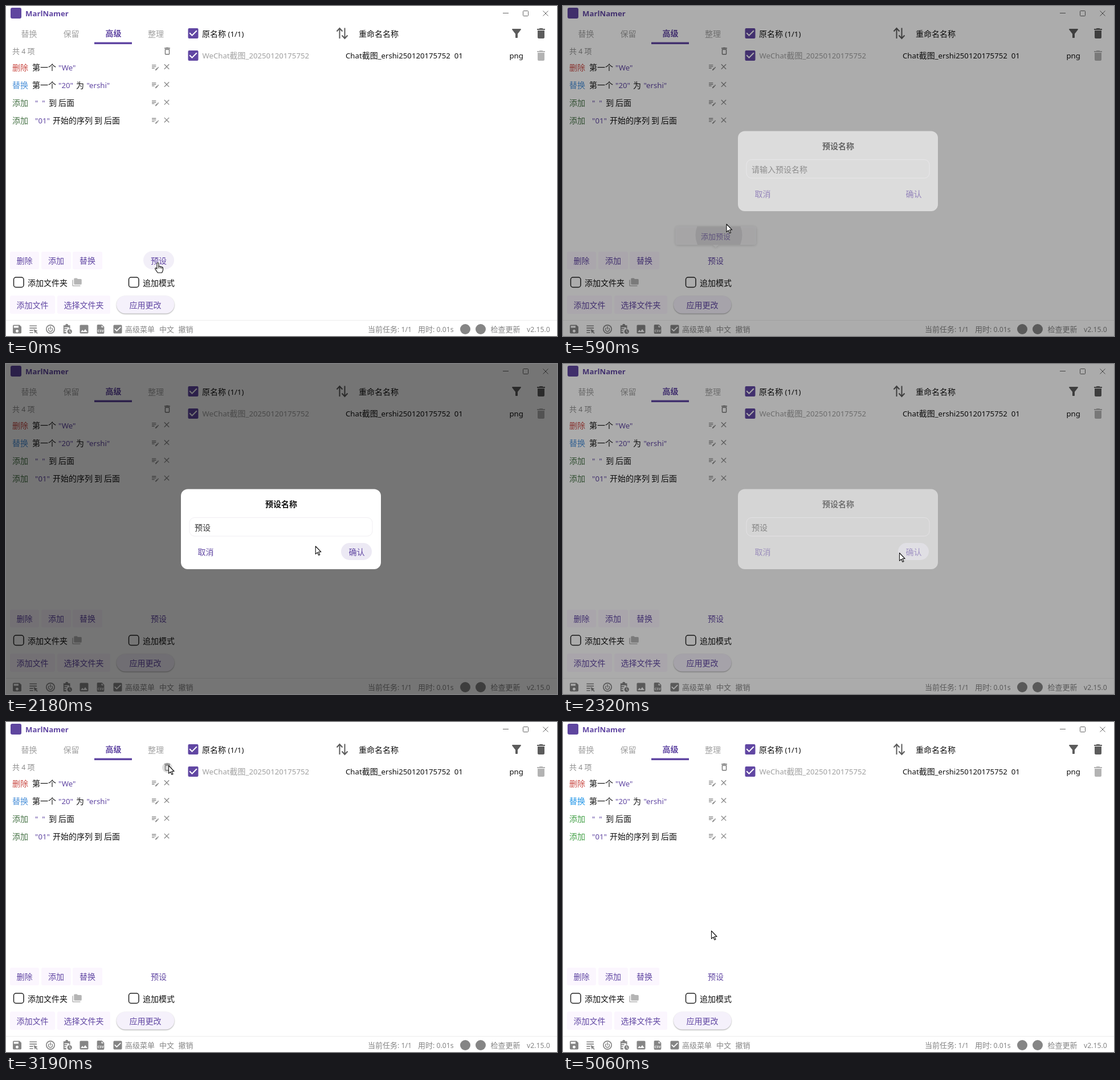
Recreate the animation shown at these times as an HTML page with a canvas. Size 967 px wide and 579 px high, loop 6680 ms.

```html
<!DOCTYPE html>
<html lang="zh-CN">
<head>
<meta charset="utf-8">
<title>批量重命名</title>
<style>
html, body { margin: 0; width: 100%; height: 100%; overflow: hidden; background: #fff; }
canvas { display: block; width: 967px; height: 579px; }
</style>
</head>
<body>
<canvas id="stage"></canvas>
<script>
const W = 967, H = 579, LOOP = 6680, TICK = 66.6;
const PURPLE = '#6147a3', BLACK = '#111', GRAY = '#a0a0a0', DARK = '#5c5c5c', FOOT = '#858585';
const canvas = document.getElementById('stage');
const ctx = canvas.getContext('2d');
const ratio = window.devicePixelRatio || 1;
canvas.width = W * ratio;
canvas.height = H * ratio;

// 24-unit icon outlines
const ICONS = Object.fromEntries(Object.entries({
  box: 'M19 3H5a2 2 0 0 0-2 2v14a2 2 0 0 0 2 2h14a2 2 0 0 0 2-2V5a2 2 0 0 0-2-2zm-9 14-5-5 1.41-1.41L10 14.17l7.59-7.59L19 8l-9 9z',
  trash: 'M6 19c0 1.1.9 2 2 2h8c1.1 0 2-.9 2-2V7H6v12zM19 4h-3.5l-1-1h-5l-1 1H5v2h14V4z',
  trashLine: 'M6 19c0 1.1.9 2 2 2h8c1.1 0 2-.9 2-2V7H6v12zM8 9h8v10H8V9zm7.5-5l-1-1h-5l-1 1H5v2h14V4h-3.5z',
  filter: 'M4.25 5.61C6.27 8.2 10 13 10 13v6c0 .55.45 1 1 1h2c.55 0 1-.45 1-1v-6s3.72-4.8 5.74-7.39A1 1 0 0 0 18.95 4H5.04a1 1 0 0 0-.79 1.61z',
  close: 'M19 6.41 17.59 5 12 10.59 6.41 5 5 6.41 10.59 12 5 17.59 6.41 19 12 13.41 17.59 19 19 17.59 13.41 12z',
  edit: 'M3 10h11v2H3v-2zm0-2h11V6H3v2zm0 8h7v-2H3v2zm15.01-3.13.71-.71a1 1 0 0 1 1.41 0l.71.71a1 1 0 0 1 0 1.41l-.71.71-2.12-2.12zm-.71.71-5.3 5.3V21h2.12l5.3-5.3-2.12-2.12z',
  folders: 'M3 6H1v13a2 2 0 0 0 2 2h17v-2H3V6zM21 4h-7l-2-2H7a2 2 0 0 0-2 2V15a2 2 0 0 0 2 2h14a2 2 0 0 0 2-2V6a2 2 0 0 0-2-2z',
  save: 'M17 3H5a2 2 0 0 0-2 2v14a2 2 0 0 0 2 2h14c1.1 0 2-.9 2-2V7l-4-4zm-5 16c-1.66 0-3-1.34-3-3s1.34-3 3-3 3 1.34 3 3-1.34 3-3 3zm3-10H5V5h10v4z',
  image: 'M21 19V5c0-1.1-.9-2-2-2H5c-1.1 0-2 .9-2 2v14c0 1.1.9 2 2 2h14c1.1 0 2-.9 2-2zM8.5 13.5l2.5 3L14.5 12l4.5 6H5l3.5-4.5z',
  listFind: 'M3 3h16v2H3zM3 8h16v2H3zM3 13h8v2H3zM3 18h8v2H3zM12 11l9 4-3.5 1.5L21 20l-1.5 1.5-3.5-3.5L14.500 21z',
  clip: 'M4 4h4a3 3 0 0 1 6 0h4v7h-2V8H6v2h6v2H6v2h4v2H6v2h4v3H4zM17 12a5 5 0 1 0 .01 0zM16.500 14h1.200v3l2 1.500-.8 1-2.400-2z',
  doc: 'M6 2h9l5 5v13a2 2 0 0 1-2 2H6a2 2 0 0 1-2-2V4a2 2 0 0 1 2-2zM14 3.500V8h4.500z'
}).map(([name, d]) => [name, new Path2D(d)]));

const ARROW = new Path2D('M0 0V13.800L3.200 10.800 5.400 15.800 7.500 14.900 5.300 10H9.600Z');
const HAND = new Path2D('M-1.600 1.400C-1.600-.4 1.400-.4 1.400 1.400V6.500C2.500 5.600 4 6 4.200 7 5.400 6.400 6.600 6.800 6.800 7.800 8 7.400 9 8 9 9.400V12.500C9 15 7.500 15.500 7.300 17.500H-.5C-.8 15.800-3.800 13-4.600 11-5.200 9.400-3.600 8.600-2.600 9.600L-1.600 10.800Z');

// Keyframes: [tick, value...]
const CURSOR = [[2, 266, 450], [5, 277, 397], [8, 277, 397], [12, 315, 338], [14, 315, 338],
  [18, 401, 284], [30, 401, 284], [34, 590, 331], [40, 590, 331], [48, 285, 76], [50, 285, 76],
  [58, 267, 450], [61, 267, 450], [67, 265, 407], [69, 260, 366]];
const POINTER = [[0, 'hand'], [8, 'arrow'], [17, 'beam'], [32, 'arrow'], [58, 'hand'], [73, 'arrow']];
const MASK = [[6, 0], [7, .1], [8, .36], [9, .6], [10, .8], [11, .93], [12, 1],
  [33, 1], [34, .83], [35, .61], [36, .42], [37, .25], [38, .12], [40, 0]];
const POPUP = [[2, 0], [4, 1], [8, 1], [11, 0], [58, 0], [60, 1], [72, 1], [75, 0]];
const PRESET_HOVER = [[2, 1], [5, 0], [56, 0], [58, 1], [61, 1], [65, 0]];

function track(keys, k) {
  let i = keys.findIndex(key => key[0] > k);
  if (i < 0) i = keys.length;
  if (i === 0 || i === keys.length) return keys[Math.max(0, i - 1)].slice(1);
  const a = keys[i - 1], b = keys[i], p = (k - a[0]) / (b[0] - a[0]);
  return a.slice(1).map((v, j) => v + (b[j + 1] - v) * p);
}
const between = (k, from, to) => k >= from && k < to;

// Latin runs are set a little smaller to sit with the CJK glyphs.
function text(str, x, cy, color = BLACK, { size = 14, bold = false, center = false } = {}) {
  const runs = str.match(/[\u3000-\u9fff]+|[^\u3000-\u9fff]+/g).map(run => {
    const cjk = /[\u3000-\u9fff]/.test(run);
    const font = (bold ? 'bold ' : '') + (cjk ? `${size}px "Noto Sans CJK SC", sans-serif`
      : `${size * .943}px "Noto Sans", sans-serif`);
    ctx.font = font;
    return { run, font, width: ctx.measureText(run).width };
  });
  if (center) x -= runs.reduce((sum, r) => sum + r.width, 0) / 2;
  ctx.fillStyle = color;
  for (const r of runs) {
    ctx.font = r.font;
    ctx.fillText(r.run, x, cy + 5);
    x += r.width;
  }
}
const centered = (str, x, y, color, opts) => text(str, x, y, color, { ...opts, center: true });

function icon(name, cx, cy, size, color) {
  ctx.save();
  ctx.translate(cx - size / 2, cy - size / 2);
  ctx.scale(size / 24, size / 24);
  ctx.fillStyle = color;
  ctx.fill(ICONS[name], 'evenodd');
  ctx.restore();
}

function box(x, y, w, h, r, fill, stroke, line = 1) {
  ctx.beginPath();
  ctx.roundRect(x, y, w, h, r);
  if (fill) { ctx.fillStyle = fill; ctx.fill(); }
  if (stroke) { ctx.strokeStyle = stroke; ctx.lineWidth = line; ctx.stroke(); }
}

function lines(color, width, ...paths) {
  ctx.strokeStyle = color;
  ctx.lineWidth = width;
  ctx.beginPath();
  for (const p of paths)
    for (let i = 0; i < p.length; i += 2) ctx[i ? 'lineTo' : 'moveTo'](p[i], p[i + 1]);
  ctx.stroke();
}

function disc(x, y, r, color) {
  ctx.fillStyle = color;
  ctx.beginPath();
  ctx.arc(x, y, r, 0, Math.PI * 2);
  ctx.fill();
}

function shadow(color, blur, dy) {
  ctx.shadowColor = color;
  ctx.shadowBlur = blur * ratio;
  ctx.shadowOffsetY = dy * ratio;
}

function drawTitleBar() {
  box(8, 3, 19, 19, 3, '#5f469f');
  text('MarlNamer', 34, 12.5, PURPLE, { bold: true });
  lines('#666', 1, [872, 12.5, 882, 12.5], [942.5, 8.5, 951.5, 17.5], [951.5, 8.5, 942.5, 17.5]);
  box(907.5, 8.5, 9, 9, 1, null, '#666');
}

function drawFiles(empty) {
  icon('box', 328.5, 48, 24, PURPLE);
  text('原名称 (1/1)', 344, 48.5);
  lines(DARK, 2, [585.500, 57, 585.500, 39.500], [580.500, 44.500, 585.500, 39, 590.500, 44.500],
    [594.500, 38.500, 594.500, 56], [589.500, 51.500, 594.500, 57, 599.500, 51.500]);
  text('重命名名称', 619, 48.5);
  icon('filter', 896, 48, 24, DARK);
  icon('trash', 939, 48, 24, DARK);
  icon('box', 328.5, 87, 24, PURPLE);
  text('WeChat截图_20250120175752', 344.5, 87, GRAY);
  text(empty ? 'WeChat截图_20250120175752' : 'Chat截图_ershi250120175752  01', 596, 87);
  text('png', 883.5, 87);
  icon('trash', 939, 87, 24, '#b3b3b3');
}

function drawRules(k) {
  const green = k < 71 ? '#477347' : '#43a047';
  const blue = k < 71 ? '#4a90d9' : '#2196e8';
  const rows = [
    ['删除', '#c94a44', [['第一个', 46], ['"We"', 92, 1]]],
    ['替换', blue, [['第一个', 46], ['"20"', 92, 1], ['为', 123], ['"ershi"', 141.5, 1]]],
    ['添加', green, [['"  "', 51, 1], ['到', 75], ['后面', 92]]],
    ['添加', green, [['"01"', 51, 1], ['开始的序列', 82], ['到', 155], ['后面', 172]]]
  ];
  text('共 4 项', 11, 79, '#8c8c8c', { size: 13 });
  if (between(k, 47, 49)) disc(283, 80, 9, 'rgba(0,0,0,.13)');
  icon('trashLine', 283, 79, 17, '#777');
  rows.forEach(([verb, color, parts], i) => {
    const y = 107.5 + i * 31.2;
    text(verb, 11, y, color);
    for (const [str, x, accent] of parts) text(str, x, y, accent ? PURPLE : BLACK);
    icon('edit', 262, y - .5, 16, '#8a8a8a');
    icon('close', 282, y - 1, 16, '#8a8a8a');
  });
}

function drawEmptyHint() {
  ['还没添加任何指令', '点击下方的', '"删除"、"添加"、"替换"', '按钮来添加']
    .forEach((str, i) => centered(str, 151.5, 210 + i * 22, '#999'));
}

function drawPanel(k, empty) {
  [['替换', 40.5], ['保留', 114.5], ['整理', 263]].forEach(([s, x]) => centered(s, x, 49, GRAY));
  centered('高级', 188.5, 47.5, PURPLE, { bold: true });
  box(155, 63.5, 66, 3.5, 0, PURPLE);
  if (empty) drawEmptyHint(); else drawRules(k);

  const soft = '#fbf6fe';
  [['删除', 7, 51], ['添加', 62, 52], ['替换', 117, 52]].forEach(([s, x, w]) => {
    box(x, 431, w, 31, 3, soft);
    centered(s, x + w / 2, 447, PURPLE);
  });
  ctx.globalAlpha = track(PRESET_HOVER, k)[0];
  box(241, 430, 54, 32, 16, '#f2eff8');
  ctx.globalAlpha = 1;
  centered('预设', 268, 447, PURPLE);

  [[13.500, '添加文件夹', 38], [215.500, '追加模式', 240]].forEach(([x, s, tx]) => {
    box(x, 476, 17.5, 17.5, 4, null, '#222', 1.5);
    text(s, tx, 486);
  });
  icon('folders', 124.5, 485, 18, '#b5b5b5');

  [['添加文件', 7, 79], ['选择文件夹', 90, 93]].forEach(([s, x, w]) => {
    box(x, 508, w, 32, 3, soft);
    centered(s, x + w / 2, 525, PURPLE);
  });
  ctx.save();
  shadow('rgba(0,0,0,.35)', 2, 1);
  box(194, 508.5, 101.5, 31, 15.5, '#f5f1fb');
  ctx.restore();
  centered('应用更改', 244.5, 525, PURPLE);
}

function drawFooter() {
  const small = { size: 13 };
  box(0, 551, W, 1, 0, '#ededed');
  icon('save', 19.5, 567, 20, FOOT);
  icon('listFind', 48.5, 567.5, 19, FOOT);
  disc(78, 567, 8, FOOT);
  disc(78, 567, 6.3, '#fff');
  ctx.beginPath();
  ctx.arc(78, 567.5, 3.5, -.9, Math.PI + .9);
  ctx.strokeStyle = FOOT;
  ctx.lineWidth = 1.5;
  ctx.stroke();
  lines(FOOT, 1.5, [78, 562, 78, 567.5]);
  icon('clip', 107.5, 567, 20, FOOT);
  icon('image', 137, 567, 20, FOOT);
  icon('doc', 166, 567, 19, FOOT);
  ctx.font = 'bold 6px "Noto Sans", sans-serif';
  ctx.fillStyle = '#fff';
  ctx.fillText('CSV', 160.5, 572);
  icon('box', 196, 567, 20, FOOT);
  [['高级菜单', 209], ['中文', 269], ['撤销', 302.5], ['当前任务: 1/1', 635], ['用时: 0.01s', 723],
    ['检查更新', 850.5], ['v2.15.0', 914]].forEach(([s, x]) => text(s, x, 567, FOOT, small));
  disc(806, 567, 9, FOOT);
  disc(833, 567, 9, FOOT);
}

function drawPopup(k) {
  const alpha = track(POPUP, k)[0];
  if (!alpha) return;
  const saved = k > 40, top = saved ? 355.5 : 386.5;
  ctx.save();
  ctx.globalAlpha = alpha;
  ctx.save();
  shadow('rgba(0,0,0,.25)', 5, 1);
  ctx.beginPath();
  ctx.roundRect(197.5, top, 141.5, 419 - top, 4);
  ctx.moveTo(263, 419);
  ctx.lineTo(268, 424);
  ctx.lineTo(273, 419);
  ctx.fillStyle = '#fff';
  ctx.fill();
  ctx.restore();
  ctx.beginPath();
  ctx.roundRect(197.5, top, 141.5, 419 - top, 4);
  ctx.clip();
  if (between(k, 6, 12) || between(k, 65, 69)) box(197, 387, 143, 32, 0, '#f8f7f9');
  if (between(k, 7, 12)) disc(273.5, 402, Math.min(41, 16 + (k - 7) * 25), 'rgba(0,0,0,.12)');
  if (saved) {
    if (k >= 69) box(197, 355, 143, 32, 0, '#f5f4f6');
    if (k >= 71) disc(261, 371, 18 + (k - 71) * 24, 'rgba(0,0,0,.1)');
    text('1. 预设', 206, 372, '#222', { size: 13 });
    icon('close', 323, 371.5, 14, '#9a8bbd');
  }
  centered('添加预设', 268, 403.5, PURPLE, { size: 13 });
  ctx.restore();
}

function drawDialog(k) {
  const shade = track(MASK, k)[0];
  if (!shade) return;
  box(0, 0, W, H, 0, `rgba(0,0,0,${shade * .54})`);
  ctx.save();
  ctx.globalAlpha = Math.pow(shade, k > 30 ? 1.4 : 1.05);
  box(307, 219.5, 351, 140.5, 12, '#fff');
  centered('预设名称', 483, 246, BLACK, { bold: true });
  box(322, 269.5, 321, 32.5, 9, null, '#f0eef2');
  const typed = k >= 25;
  text(typed ? '预设' : '请输入预设名称', 331, 286.5, typed ? '#333' : '#555');
  if (between(k, 22, 28)) box(typed ? 359.5 : 331, 275.5, 2, 21, 1, PURPLE);
  if (k >= 33) box(588, 314, 54, 30, 15, '#ece9f4');
  centered('取消', 350.5, 330, PURPLE);
  centered('确认', 615.5, 330, PURPLE);
  ctx.restore();
}

function drawCursor(k) {
  const [x, y] = track(CURSOR, k);
  const kind = POINTER.filter(p => p[0] <= k).pop()[1];
  if (kind === 'beam') {
    lines('#222', 1, [x - 3, y - 6.5, x + 3, y - 6.5], [x + .5, y - 6, x + .5, y + 7], [x - 3, y + 7.5, x + 3, y + 7.5]);
    return;
  }
  ctx.save();
  ctx.translate(x + .5, y + .5);
  const shape = kind === 'hand' ? HAND : ARROW;
  ctx.fillStyle = '#fff';
  ctx.strokeStyle = '#111';
  ctx.lineWidth = 1.1;
  ctx.lineJoin = 'round';
  ctx.fill(shape);
  ctx.stroke(shape);
  if (kind === 'hand') lines('#111', 1, [1.4, 6.5, 1.4, 10], [4.2, 7, 4.2, 10], [6.8, 8, 6.8, 10.5]);
  ctx.restore();
}

function render(time) {
  const k = Math.floor((time % LOOP + 22) / TICK) % 100;
  const empty = between(k, 49, 73);
  ctx.setTransform(ratio, 0, 0, ratio, 0, 0);
  box(0, 0, W, H, 0, '#fff');
  drawTitleBar();
  drawPanel(k, empty);
  drawFiles(empty);
  drawFooter();
  drawPopup(k);
  drawDialog(k);
  drawCursor(k);
}

let start;
function frame(now) {
  start ??= now;
  render(Math.max(0, now - start));
  requestAnimationFrame(frame);
}
render(0);
requestAnimationFrame(frame);
</script>
</body>
</html>
```
